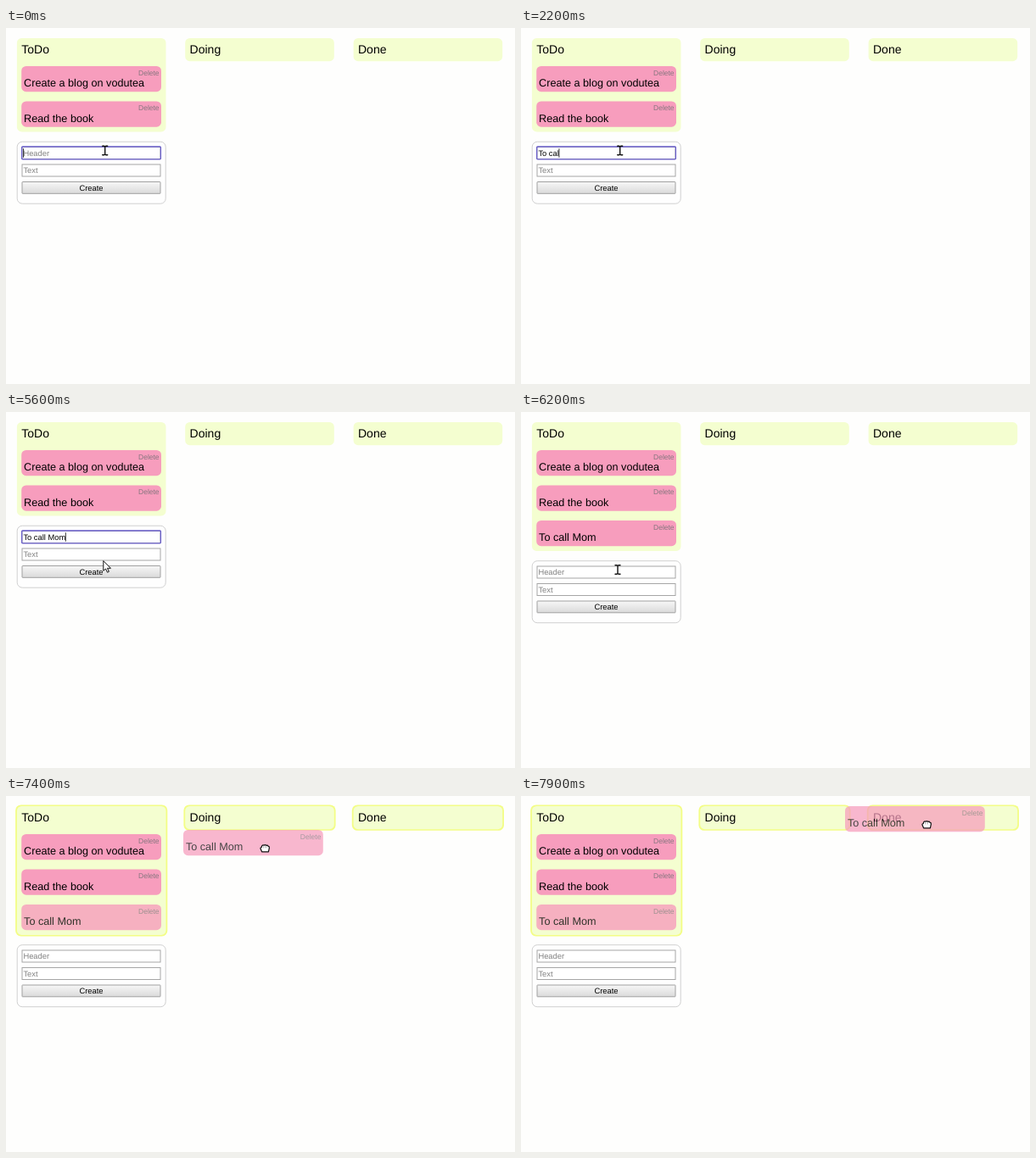
An HTML page that plays this animation: 600 px wide and 420 px high, repeating every 8000 ms.

```html
<!DOCTYPE html>
<html lang="en">
<head>
<meta charset="utf-8">
<title>Task board</title>
<style>
  html, body { margin: 0; width: 100%; height: 100%; overflow: hidden; background: #fefefd; }
  svg { display: block; width: 600px; height: 420px; }
  text { font-family: "Liberation Sans", Arial, sans-serif; white-space: pre; text-rendering: geometricPrecision; }
  .head { font-size: 14px; }
  .title { font-size: 12.65px; }
  .delete { font-size: 8.5px; fill: #85767e; text-anchor: end; }
  .field { font-size: 9.33px; }
  .hint { fill: #808080; }
  .column { fill: #f4fed0; }
  .glow { fill: #f3fd86; display: none; }
  .dragging .glow { display: inline; }
  .input { fill: #fff; stroke: #a6a6a6; }
  .cursor path { stroke-linejoin: round; stroke-linecap: round; }
</style>
</head>
<body>
<svg id="stage" viewBox="0 0 600 420"></svg>
<script>
const LOOP = 8000, TICK = 100;
const CREATED = 6000, BLURRED = 5900, PICKED = 7000, DRAGGED = 7100;
const ROW = 41.5;
const MESSAGE = "To call Mom";
const KEY_TIMES = [800, 900, 1300, 1900, 1900, 2200, 2300, 2400, 2900, 3300, 4800];

// Pointer path: time, x, y
const PATH = [
  [0, 116.7, 144.5], [5200, 116.7, 144.5], [5600, 114.8, 176], [5800, 114, 186],
  [6200, 114, 186], [6800, 115, 148], [7000, 115, 148], [7100, 140, 137],
  [7400, 305, 62], [7700, 407, 43], [7900, 478, 34], [8000, 505, 33]
];

const rect = (x, y, w, h, r, attrs) =>
  `<rect x="${x}" y="${y}" width="${w}" height="${h}" rx="${r}" ${attrs}/>`;

const text = (x, y, cls, str, attrs = "") =>
  `<text x="${x}" y="${y}" class="${cls}" ${attrs}>${str}</text>`;

const column = (x, name) =>
  rect(x - 1.8, 10.4, 179.2, 30.4, 6.5, 'class="glow"') +
  rect(x, 12, 175.6, 27.2, 5.5, 'class="column"') +
  text(x + 5.4, 30.4, "head", name);

const card = (x, y, title, attrs = "") =>
  `<g transform="translate(${x} ${y})" ${attrs}>` +
  rect(0, 0, 164.8, 30.2, 5.5, 'fill="#f79dbd"') +
  text(162.4, 10.8, "delete", "Delete") +
  text(2.9, 24, "title", title) + "</g>";

const cursor = (id, body) => `<g id="${id}" class="cursor">${body}</g>`;

const stage = document.getElementById("stage");
stage.innerHTML = `
  <defs><linearGradient id="face" x2="0" y2="1">
    <stop stop-color="#f7f7f7"/><stop offset="1" stop-color="#dadada"/>
  </linearGradient></defs>` +
  column(12.9, "ToDo") + column(211.2, "Doing") + column(409.6, "Done") +
  card(18.2, 45, "Create a blog on vodutea") +
  card(18.2, 45 + ROW, "Read the book") +
  card(18.2, 45 + 2 * ROW, MESSAGE, 'id="added"') +
  '<g id="form">' +
  rect(13.2, 134.2, 175, 73, 6, 'fill="#fefefe" stroke="#d0d0d0"') +
  rect(19, 140.5, 163, 14, 0, 'id="header" class="input"') +
  rect(18.6, 140, 163.8, 14.8, 1, 'id="focus" fill="none" stroke="#6a5fcb" stroke-width="1.3"') +
  text(20.4, 150.7, "field hint", "Header", 'id="hint"') +
  text(20.4, 150.7, "field", "", 'id="typed"') +
  rect(0, 142.2, 0.9, 10.6, 0, 'id="caret" fill="#222"') +
  rect(19, 161, 163, 14, 0, 'class="input"') +
  text(20.4, 171.2, "field hint", "Text") +
  rect(19, 181.5, 163, 13.8, 0.5, 'fill="url(#face)" stroke="#a0a0a0"') +
  text(100.5, 191.6, "field", "Create", 'text-anchor="middle"') +
  "</g>" +
  card(0, 0, MESSAGE, 'id="ghost" opacity=".73"') +
  cursor("beam", '<path d="M-3-5.3H-1L0-4.6 1-5.3H3M0-4.6V4.6M-3 5.3H-1L0 4.6 1 5.3H3" fill="none" stroke="#111" stroke-width="1.4"/>') +
  cursor("arrow", '<path d="M0 0V11.3L2.7 9 4.7 13.2 6.6 12.3 4.7 8.3H8.3Z" fill="#fff" stroke="#111"/>') +
  cursor("hand", '<path d="M-1.2.6Q-.4-.4.5.6L2 3.6 6.3 4.2Q7.3 4.6 7.3 6V9.6L6.3 11H.6L-3 7.4Q-3.4 6-2 6L0 6.6Z" fill="#fff" stroke="#111" stroke-width="1.1"/>') +
  cursor("fist", '<path d="M-5 0Q-5.4-1.2-3.8-1.4L-3.4-3.2Q-2-4.6-.8-3.8 .6-4.8 1.8-3.6 3.4-4.2 4-2.8 5.6-2.6 5.4-.8L4.4 3.8H-3.4Z" fill="#fff" stroke="#111" stroke-width="1.2"/><path d="M-1.2-2.4V-1M1.3-2.4V-1" stroke="#777" stroke-width=".7"/>');

const el = id => document.getElementById(id);
const show = (id, on) => el(id).setAttribute("display", on ? "inline" : "none");
const move = (id, x, y) => el(id).setAttribute("transform", `translate(${x} ${y})`);

function pointerAt(t) {
  const i = PATH.findIndex(p => p[0] > t);
  const [t0, x0, y0] = PATH[i - 1], [t1, x1, y1] = PATH[i];
  const k = (t - t0) / (t1 - t0);
  return [x0 + (x1 - x0) * k, y0 + (y1 - y0) * k];
}

function cursorKind(t, y) {
  if (t >= DRAGGED) return "fist";
  if (t >= CREATED) return y > 181 ? "beam" : y < 158 ? "hand" : "arrow";
  return y < 155 || (y > 161 && y < 175) ? "beam" : "arrow";
}

function draw(now) {
  const t = Math.floor(now % LOOP / TICK) * TICK;
  const created = t >= CREATED, focused = t < BLURRED, dragging = t >= DRAGGED;
  const [x, y] = pointerAt(t);

  const shift = created ? ROW : 0;
  move("form", 0, shift);
  stage.querySelector(".column").setAttribute("height", 110.4 + shift);
  stage.querySelector(".glow").setAttribute("height", 113.6 + shift);
  stage.classList.toggle("dragging", dragging);
  show("added", created);
  el("added").setAttribute("opacity", t >= PICKED ? 0.8 : 1);

  const typed = created ? "" : MESSAGE.slice(0, KEY_TIMES.filter(k => k <= t).length);
  el("typed").textContent = typed;
  show("hint", !typed);
  show("focus", focused);
  show("caret", focused);
  el("caret").setAttribute("x", 20.1 + (typed ? el("typed").getComputedTextLength() : 0));

  show("ghost", dragging);
  move("ghost", x - 96, y - 22);
  const kind = cursorKind(t, y);
  for (const id of ["beam", "arrow", "hand", "fist"]) show(id, id === kind);
  move(kind, x, y);
}

const start = performance.now();
(function frame() {
  draw(performance.now() - start);
  requestAnimationFrame(frame);
})();
</script>
</body>
</html>
```
